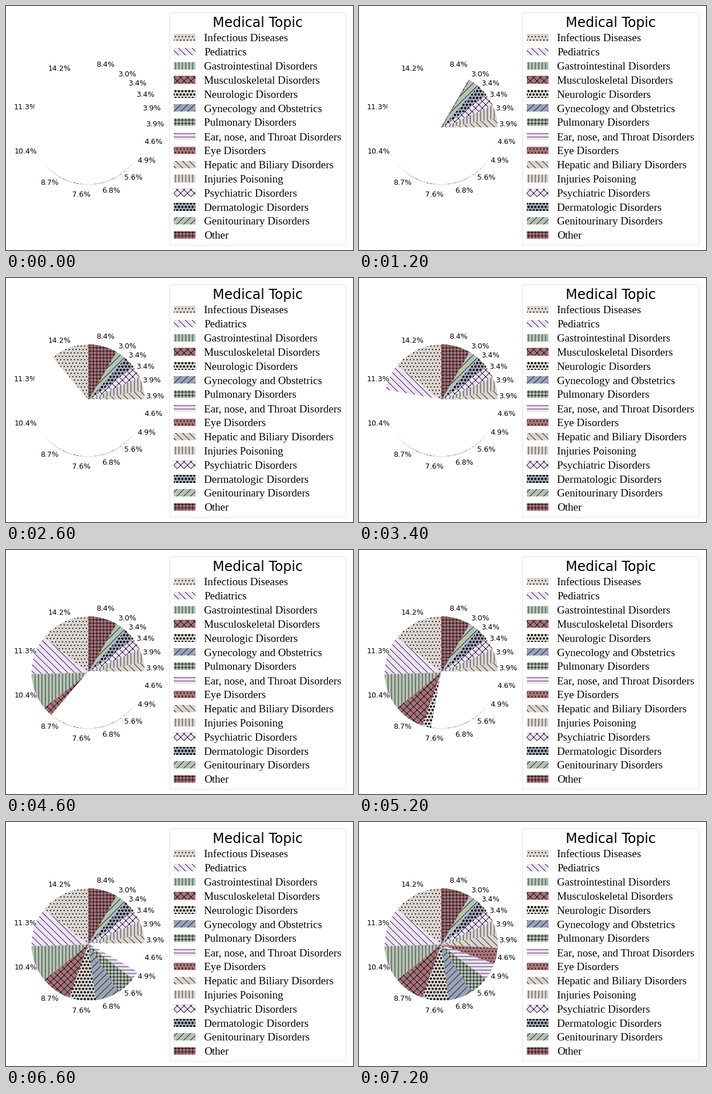
These frames come from a looping animation (608x430 px, 7.4 s). A matplotlib script:

```python
import math

import matplotlib.pyplot as plt
from matplotlib.animation import FuncAnimation
from matplotlib.patches import FancyBboxPatch, Rectangle, Wedge

W, H, DPI = 608, 430, 72  # one point is one pixel
FRAMES, INTERVAL = 37, 200
STEP = 10  # degrees uncovered per frame

GREY, LILAC, GREEN = "#dad5d0", "#eee2fd", "#b4c3b5"
RED, BLUE = "#a5727a", "#9ba3b6"

TOPICS = [
    ("Infectious Diseases", 14.2, GREY, ".."),
    ("Pediatrics", 11.3, LILAC, "\\\\"),
    ("Gastrointestinal Disorders", 10.4, GREEN, "||"),
    ("Musculoskeletal Disorders", 8.7, RED, "xx"),
    ("Neurologic Disorders", 7.6, GREY, "oo"),
    ("Gynecology and Obstetrics", 6.8, BLUE, "//"),
    ("Pulmonary Disorders", 5.6, GREEN, "++"),
    ("Ear, nose, and Throat Disorders", 4.9, LILAC, "--"),
    ("Eye Disorders", 4.6, RED, ".."),
    ("Hepatic and Biliary Disorders", 3.9, GREY, "\\\\"),
    ("Injuries Poisoning", 3.9, GREY, "||"),
    ("Psychiatric Disorders", 3.4, LILAC, "xx"),
    ("Dermatologic Disorders", 3.4, BLUE, "oo"),
    ("Genitourinary Disorders", 3.0, GREEN, "//"),
    ("Other", 8.4, RED, "++"),
]

plt.rcParams["hatch.linewidth"] = 0.8

# The small margin keeps the pixel size from truncating one short.
fig = plt.figure(figsize=((W + 0.01) / DPI, (H + 0.01) / DPI), dpi=DPI,
                 facecolor="white")
ax = fig.add_axes([0, 0, 1, 1])
ax.set(xlim=(0, W), ylim=(0, H))
ax.axis("off")


def draw_pie(cx, cy, radius, label_radius):
    total = sum(topic[1] for topic in TOPICS)
    start = 90
    for _, share, color, hatch in TOPICS:
        end = start + 360 * share / total
        ax.add_patch(Wedge((cx, cy), radius, start, end, fc=color, hatch=hatch))
        mid = math.radians((start + end) / 2)
        ax.text(cx + label_radius * math.cos(mid),
                cy + label_radius * math.sin(mid),
                f"{share:.1f}%", fontsize=12.67, family="DejaVu Sans",
                ha="center", va="center")
        start = end


def draw_legend():
    left, right, top, bottom = 286.8, 596.2, H - 11.5, H - 421.8
    ax.add_patch(FancyBboxPatch(
        (left, bottom), right - left, top - bottom,
        boxstyle="round,pad=0,rounding_size=3.8",
        fc="white", ec="#e2e2e2", lw=1))
    ax.text(441, H - 36.5, "Medical Topic", fontsize=23.8,
            family="DejaVu Sans", ha="center", va="baseline")
    for row, (name, _, color, hatch) in enumerate(TOPICS):
        base = H - 62.2 - 24.86 * row
        ax.add_patch(Rectangle((294.2, base), 38, 13.3, fc=color, hatch=hatch))
        ax.text(347.4, base, name, fontsize=19, family="Liberation Serif",
                ha="left", va="baseline")


draw_pie(144, H - 216, 99, 117)
draw_legend()

# White cover, set slightly above the pie so a thin rim shows below it.
cover = Wedge((143.8, H - 213.8), 100.4, 0, 360, fc="white", lw=0, zorder=5)
ax.add_patch(cover)


def update(frame):
    angle = STEP * frame
    cover.set_theta1(angle)
    cover.set_visible(angle < 360)
    return (cover,)


anim = FuncAnimation(fig, update, frames=FRAMES, interval=INTERVAL,
                     init_func=lambda: update(0), repeat=True, repeat_delay=0)
plt.show()
```
